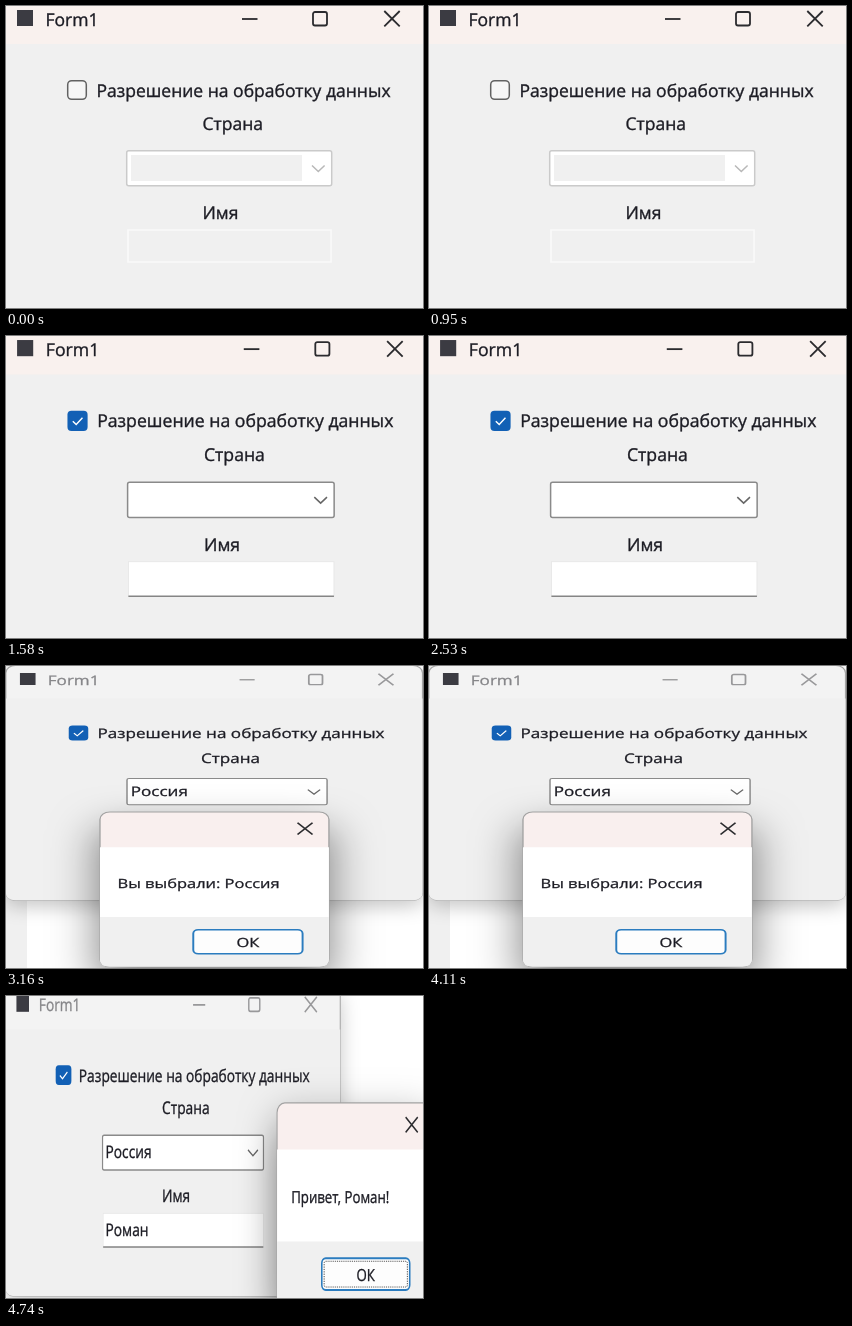
These frames come from a looping animation (417x302 px, 6320 ms). An HTML page:

```html
<!DOCTYPE html>
<html lang="ru">
<head>
<meta charset="utf-8">
<style>
  html, body { margin: 0; width: 100%; height: 100%; overflow: hidden; background: #fff; }
  svg { display: block; width: 100vw; height: 100vh; }
  text { font-family: "Open Sans", "Noto Sans", sans-serif; font-size: 17.5px; fill: #1c1c24; stroke: #1c1c24; stroke-width: .35px; text-rendering: geometricPrecision; }
  .dialog text { font-size: 16.85px; }
  .faded { fill: #858588; stroke: #858588; }
  .form { filter: drop-shadow(0 8px 12px rgba(0, 0, 0, .22)); }
  .dialog { filter: drop-shadow(0 22px 24px rgba(0, 0, 0, .5)); }
</style>
</head>
<body>
<svg id="stage" viewBox="0 0 417 302" preserveAspectRatio="none"></svg>
<script>
const STEP = 1580;
const stage = document.getElementById('stage');

// view: scale x, scale y, shift x, shift y
const scenes = [
  { view: [1, 1, 0, 0], active: true },
  { view: [1.0075, 1.01, 0, 0], active: true, checked: true },
  { view: [.976, .75, 3.2, 4], checked: true, country: 'Россия', strip: true,
    dialog: { x: 93, y: 189.3, w: 234.6, text: 'Вы выбрали: Россия' } },
  { view: [.785, .99, 1.8, -4], checked: true, country: 'Россия', name: 'Роман',
    dialog: { x: 343, y: 112, w: 196, text: 'Привет, Роман!', focus: true } }
];

const rect = (x, y, w, h, fill, more = '') =>
  `<rect x="${x}" y="${y}" width="${w}" height="${h}" fill="${fill}" ${more}/>`;
const line = (d, color, width = 1.8) =>
  `<path d="${d}" fill="none" stroke="${color}" stroke-width="${width}"/>`;
const text = (x, y, s, more = '') => `<text x="${x}" y="${y}" ${more}>${s}</text>`;
const cross = (x, y, color) =>
  line(`M${x - 7.7} ${y - 8}l15.4 15.4m0 -15.4l-15.4 15.4`, color);

// Block with rounded lower corners
const base = (x, y, w, h, r, fill) =>
  `<path fill="${fill}" d="M${x} ${y}h${w}v${h - r}q0 ${r} ${-r} ${r}h${2 * r - w}q${-r} 0 ${-r} ${-r}z"/>`;

function titleBar(active) {
  const ink = active ? '#2b2b2e' : '#98989a';
  return rect(11, 4, 16, 16, '#3b3b42')
    + text(39.5, 19.5, 'Form1', active ? '' : 'class="faded"')
    + line('M236 13h15.5', ink)
    + rect(307, 6, 14, 13.5, 'none', `rx="2" stroke="${ink}" stroke-width="1.8"`)
    + cross(386, 13, ink);
}

function fields({ checked, country = '', name = '' }) {
  const box = checked
    ? rect(61, 74, 20, 20, '#1260b5', 'rx="4"') + line('M66.3 84.3l3.4 3.4 6.2 -6.8', '#fff', 1.4)
    : rect(61.7, 74.7, 18.6, 18.6, '#f6f6f6', 'rx="4" stroke="#626262" stroke-width="1.5"');
  const combo = rect(120.7, 144.7, 205, 35, '#fff',
      `rx="2" stroke="${checked ? '#8a8a8a' : '#cacaca'}" stroke-width="1.5"`)
    + (checked ? '' : rect(125, 149, 171, 26, '#f0f0f0'))
    + line('M306 159.5l6.3 6 6.3 -6', checked ? '#666' : '#b8b8b8', 1.5);
  const input = checked
    ? rect(121.5, 223.5, 204, 34.5, '#fff', 'stroke="#e6e6e6" stroke-width=".8"') + line('M121.5 257.6h204', '#858585', 1.5)
    : rect(122, 224, 203, 32, '#f0f0f0', 'stroke="#fafafa" stroke-width="1.5"');
  return box + text(90.5, 90.5, 'Разрешение на обработку данных')
    + text(196.5, 123.5, 'Страна') + combo + text(124.5, 167.5, country)
    + text(196.5, 212.5, 'Имя') + input + text(124.5, 246, name);
}

function dialog({ x, y, w, text: message, focus }) {
  const left = w - 140;
  return `<g class="dialog" transform="translate(${x} ${y})">`
    + rect(0, 0, w, 206, '#f9efee', 'rx="10" stroke="#a2a2a2" stroke-width="1.4"')
    + base(0, 47, w, 159, 10, '#fff')
    + base(0, 140, w, 66, 10, '#f0f0f0')
    + cross(w - 24.5, 22.5, '#2b2b2e')
    + text(18, 101, message)
    + rect(left + 1, 157, 112, 32, '#fdfdfd', 'rx="5" stroke="#2b7cbf" stroke-width="2"')
    + (focus ? rect(left + 4, 160, 106, 26, 'none', 'rx="2" stroke="#333" stroke-dasharray="1.2 1.2"') : '')
    + text(left + 57, 179.5, 'ОК', 'text-anchor="middle"')
    + '</g>';
}

function render(scene) {
  const [sx, sy, dx, dy] = scene.view;
  return rect(0, 0, 417, 302, '#fff')
    + (scene.strip ? rect(0, 0, 21, 302, '#f0f0f0') : '')
    + `<g transform="translate(${dx} ${dy}) scale(${sx} ${sy})">`
    + '<g class="form">'
    + rect(-3.5, -6, 427, 313, scene.active ? '#f9f1ee' : '#f3f3f3', 'rx="10" stroke="#a5a5a5" stroke-width="1.3"')
    + base(-3.5, 38, 427, 269, 10, '#f0f0f0')
    + '</g>'
    + titleBar(scene.active) + fields(scene)
    + (scene.dialog ? dialog(scene.dialog) : '')
    + '</g>';
}

let shown = -1;
const start = performance.now();

function tick() {
  const index = Math.floor((performance.now() - start) / STEP) % scenes.length;
  if (index !== shown) stage.innerHTML = render(scenes[shown = index]);
  requestAnimationFrame(tick);
}
tick();
</script>
</body>
</html>
```
